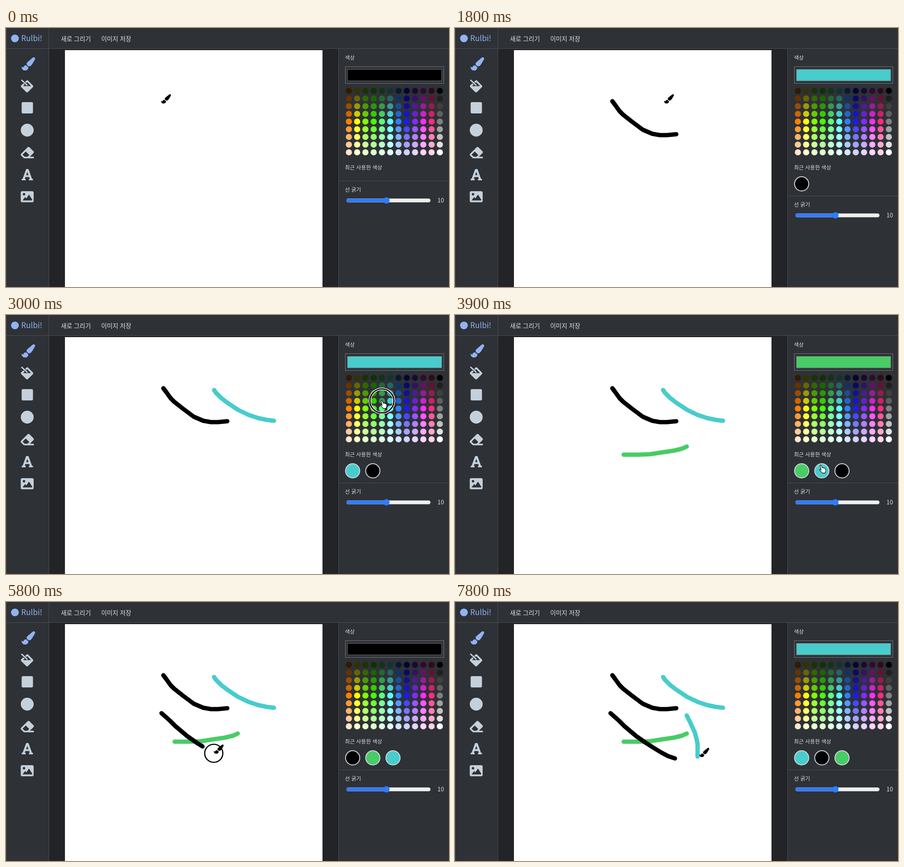
An HTML page for the animation above (7.9 s loop, 977 by 573 pixels).

```html
<!DOCTYPE html>
<html lang="ko">
<head>
<meta charset="utf-8">
<style>
html, body { margin: 0; width: 100%; height: 100%; overflow: hidden; background: #222428; }
svg { display: block; width: 977px; height: 573px; }
text { font-family: "Noto Sans CJK KR", "Noto Sans CJK", "Noto Sans", sans-serif; font-weight: 500; fill: #dee2e6; }
.menu { font-size: 13.6px; }
.label { font-size: 11.7px; }
.line { stroke: #4b4f54; fill: none; }
.stroke { fill: none; stroke-width: 9.6; stroke-linecap: round; stroke-linejoin: round; }
</style>
</head>
<body>
<svg viewBox="0 0 977 573">
  <defs>
    <path id="brush" d="M167 309c-40 3-76 18-97 73-2 6-8 10-15 10-11 0-45-28-55-35C0 440 38 512 128 512c76 0 128-44 128-120 0-3-1-6-1-9zM458 0c-15 0-29 7-40 16C213 199 192 203 192 257c0 14 3 27 9 39l64 53c7 2 14 3 22 3 62 0 98-45 211-256 7-15 14-30 14-46C512 21 486 0 458 0z"/>
  </defs>
  <rect width="977" height="573" fill="#222428"/>
  <g fill="#2e3136">
    <rect width="977" height="45"/>
    <rect width="94" height="573"/>
    <rect x="734" width="243" height="573"/>
  </g>
  <path class="line" d="M0 45.5H977M94.5 0V573M733.5 46V573M.5 0V573"/>
  <rect x="130" y="49" width="568" height="524" fill="#fff"/>

  <circle cx="19.7" cy="23" r="8.6" fill="#91b3f2"/>
  <text x="33.5" y="29.3" font-size="17" style="fill:#91b3f2">Rulbi!</text>
  <text class="menu" x="121" y="28.8">새로 그리기</text>
  <text class="menu" x="210" y="28.8">이미지 저장</text>

  <use href="#brush" transform="translate(34.3 64.8) scale(.0585 .057)" fill="#91b3f2"/>
  <g fill="#c5d0da">
    <path d="M45.2 116.4q1.8-1.7 3.6 0l10.6 10.8q1.6 1.8 0 3.6l-10.8 10.6q-2.1 2-4.2 0l-10.6-10.4q-2-2.2 0-4.4z"/>
    <path d="M46.7 119.8l8.6 8.7H37.6z" fill="#2e3136"/>
    <path d="M34.8 115.6l11.6 11" fill="none" stroke="#2e3136" stroke-width="5"/>
    <path d="M34.8 115.6l11.6 10.6" fill="none" stroke="#c5d0da" stroke-width="2.8" stroke-linecap="round"/>
    <rect x="34.5" y="164" width="25" height="25" rx="3"/>
    <circle cx="46.8" cy="226" r="14.2"/>
    <path transform="translate(32.5 261.2) scale(.0566)" d="M498 274c19-19 19-49 0-68l-160-160c-19-19-49-19-68 0l-256 256c-19 19-19 49 0 68l96 96a48 48 0 0 0 34 14h356c7 0 12-5 12-12v-40c0-7-5-12-12-12H356zM195 211l138 138-68 67H151l-80-80z"/>
    <path transform="translate(34.5 310.2) scale(.0558)" d="M432 416h-23L278 54a32 32 0 0 0-30-22h-47a32 32 0 0 0-30 22L39 416H16a16 16 0 0 0-16 16v32a16 16 0 0 0 16 16h128a16 16 0 0 0 16-16v-32a16 16 0 0 0-16-16h-20l24-64h152l24 64h-20a16 16 0 0 0-16 16v32a16 16 0 0 0 16 16h128a16 16 0 0 0 16-16v-32a16 16 0 0 0-16-16zM177 272l47-129 47 129z"/>
    <rect x="32.5" y="361" width="28.5" height="24.5" rx="3.6"/>
    <g fill="#2e3136">
      <circle cx="39.7" cy="367.8" r="2.7"/>
      <path d="M36.6 381.2l5.6-7.3 2.7 3.2 5-7.6q.7-.8 1.5 0l6.6 10.4q.3 1.3-1 1.5H37.3z"/>
    </g>
  </g>

  <text class="label" x="747.6" y="69.8">색상</text>
  <rect x="748.5" y="85.5" width="217" height="37" fill="none" stroke="#767b80"/>
  <rect id="swatch" x="753" y="91.5" width="208" height="25.5" stroke="#777"/>
  <g id="palette"></g>
  <text class="label" x="747.6" y="313">최근 사용한 색상</text>
  <g id="recent" stroke="#ced4da" stroke-width="2"></g>
  <g id="width">
    <path class="line" d="M734 338.5H977"/>
    <text class="label" x="747.6" y="362">선 굵기</text>
    <rect x="751" y="377.5" width="185" height="8" rx="4" fill="#efefef" stroke="#b8babd" stroke-width=".8"/>
    <path d="M755 377.5H839v8H755a4 4 0 0 1 0-8z" fill="#2f7bff"/>
    <circle cx="839" cy="381.5" r="7" fill="#2f7bff"/>
    <text x="951.6" y="386" font-size="13" style="font-weight:400">10</text>
  </g>

  <g id="ink"></g>
  <g id="cursor">
    <g id="ring" fill="none">
      <circle stroke="#fff" stroke-width="5.4"/>
      <circle stroke="#000" stroke-width="2.6"/>
    </g>
    <use id="pen" href="#brush" transform="translate(0 -19.4) scale(.0425 .04)"/>
    <path id="arrow" d="M0 0V14.4l3.3-3.1 2.3 5.2 2.4-1-2.2-5.1h4.6z" stroke="#fff"/>
    <path id="hand" d="M-1.6 1.2C-2.6-1 .2-2 1.1.2L3 5.2c.7-1 2.4-.7 2.7.4.9-.7 2.3-.3 2.5.8 1.1-.5 2 .2 2.2 1.3.5 2.7 1 4.500-.6 6.500L9.500 16.600H2.700C1.500 14.500-.9 12.500-2.700 10.700c-1.300-1.500.2-2.900 1.700-1.900l1.500 1.200z" fill="#fff" stroke="#000" stroke-width="1.1"/>
  </g>
</svg>
<script>
const LOOP = 7900, STEP = 100;
const BLACK = '#000000', CYAN = '#48cccc', GREEN = '#48cc66';
const $ = id => document.getElementById(id);

function add(parent, tag, attrs) {
  const el = document.createElementNS('http://www.w3.org/2000/svg', tag);
  for (const k in attrs) el.setAttribute(k, attrs[k]);
  return parent.appendChild(el);
}

// Palette: each column runs from dark shades through a pure hue to tints.
const hues = ['ff8000', 'ffff00', '80ff00', '44ff00', '5aff80', '5affff',
  '2b80ff', '1a1aff', '802bff', 'ff2bff', 'ff2b80'];
function shade(col, row) {
  if (col === 11) return Array(3).fill(Math.min(255, row * 32));
  const rgb = hues[col].match(/../g).map(h => parseInt(h, 16));
  return rgb.map(v => Math.round(row < 5 ? v * (row + 1) / 5 : v + (255 - v) * (row - 4) / 5));
}
const css = (rgb, k = 1) => `rgb(${rgb.map(v => Math.round(v * k))})`;
const dots = [];
for (let row = 0; row < 9; row++) {
  for (let col = 0; col < 12; col++) {
    const x = 756.2 + 18.24 * col, y = 139 + 17 * row, rgb = shade(col, row);
    dots.push({ x, y, rgb, el: add($('palette'), 'circle', { cx: x, cy: y, r: 6.8 }) });
  }
}

const slots = [764.5, 809, 853.5].map(x => ({ x, y: 344.8 }));
for (const s of slots) s.el = add($('recent'), 'circle', { cx: s.x, cy: s.y, r: 15.7 });

const strokes = [
  [100, 800, BLACK, '347,162 353,170 363,184 371,192 390,207 414,225 435,234 452,237 467,237 488,235'],
  [1900, 2400, CYAN, '459,166 463,172 475,184 488,194 512,210 535,221 556,228 575,232 591,234'],
  [3200, 3500, GREEN, '372,309 405,309 430,308 456,304 483,300 500,296 511,291'],
  [5300, 5900, BLACK, '343,246 361,262 374,275 400,297 420,311 437,322 455,333 470,341 485,346'],
  [7200, 7700, CYAN, '511,251 519,267 529,289 533,304 535,314 535,342']
].map(([start, end, color, points]) => {
  const el = add($('ink'), 'polyline', { class: 'stroke', stroke: color, points });
  return { start, end, color, el, len: el.getTotalLength() };
});

// A click is released at its time; the colour follows one step later.
const clicks = [[1300, CYAN], [3000, GREEN], [4100, BLACK], [6600, CYAN]];

const keys = [
  [0, 342, 166], [1200, 847, 190], [1300, 847, 190], [1800, 461, 166],
  [2900, 829, 190], [3000, 829, 190], [3900, 807, 333], [4000, 853, 344], [4300, 853, 344],
  [4800, 339, 243], [4900, 339, 243], [6500, 853, 344], [6700, 853, 344],
  [6900, 820, 343], [7800, 539, 342]
];
for (const s of strokes) {
  for (const [t, d] of [[s.start, 0], [s.end, s.len]]) {
    const p = s.el.getPointAtLength(d);
    keys.push([t, p.x, p.y]);
  }
}
keys.sort((a, b) => a[0] - b[0]);

function cursorAt(t) {
  const s = strokes.find(s => t >= s.start && t <= s.end);
  if (s) return s.el.getPointAtLength(s.len * (t - s.start) / (s.end - s.start));
  let i = 0;
  while (i < keys.length - 2 && keys[i + 1][0] <= t) i++;
  const [t0, x0, y0] = keys[i], [t1, x1, y1] = keys[i + 1];
  const u = Math.min(1, (t - t0) / (t1 - t0)), e = u * u * (3 - 2 * u);
  return { x: x0 + (x1 - x0) * e, y: y0 + (y1 - y0) * e };
}

function ringAt(t) {
  if (clicks.some(c => t === c[0])) return 26.5;
  const held = clicks.some(c => t === c[0] - STEP) || strokes.some(s => t > s.start && t < s.end);
  return held ? 20 : 0;
}

const show = (el, on) => el.setAttribute('visibility', on ? 'visible' : 'hidden');

function render(time) {
  const t = Math.floor(time % LOOP / STEP) * STEP;
  const p = cursorAt(t);

  let recent = [];
  for (const s of strokes) {
    const head = t - STEP - s.start;
    show(s.el, head >= 0);
    if (head < 0) continue;
    const d = Math.min(1, head / (s.end - s.start)) * s.len;
    s.el.setAttribute('stroke-dasharray', `${Math.max(.01, d)} 9999`);
    recent = [s.color, ...recent.filter(c => c !== s.color)];
  }
  slots.forEach((s, i) => {
    show(s.el, i < recent.length);
    s.el.setAttribute('fill', recent[i] || BLACK);
  });
  $('width').setAttribute('transform', `translate(0 ${recent.length ? 33 : 0})`);

  let color = BLACK;
  for (const [at, c] of clicks) if (t > at) color = c;
  $('swatch').setAttribute('fill', color);

  let hand = slots.some((s, i) => i < recent.length && Math.abs(p.x - s.x) < 8 && Math.abs(p.y - s.y) < 15);
  for (const d of dots) {
    const over = Math.hypot(p.x - d.x, p.y - d.y) < 6.8;
    d.el.setAttribute('fill', css(d.rgb, over ? .75 : 1));
    hand = hand || over;
  }
  const pen = p.x > 130 && p.x < 698 && p.y > 49;
  show($('pen'), pen);
  show($('hand'), hand);
  show($('arrow'), !pen && !hand);
  const r = ringAt(t);
  show($('ring'), r > 0);
  for (const c of $('ring').children) c.setAttribute('r', r);
  $('cursor').setAttribute('transform', `translate(${p.x} ${p.y})`);
}

const begin = performance.now();
function tick() {
  render(performance.now() - begin);
  requestAnimationFrame(tick);
}
tick();
</script>
</body>
</html>
```
